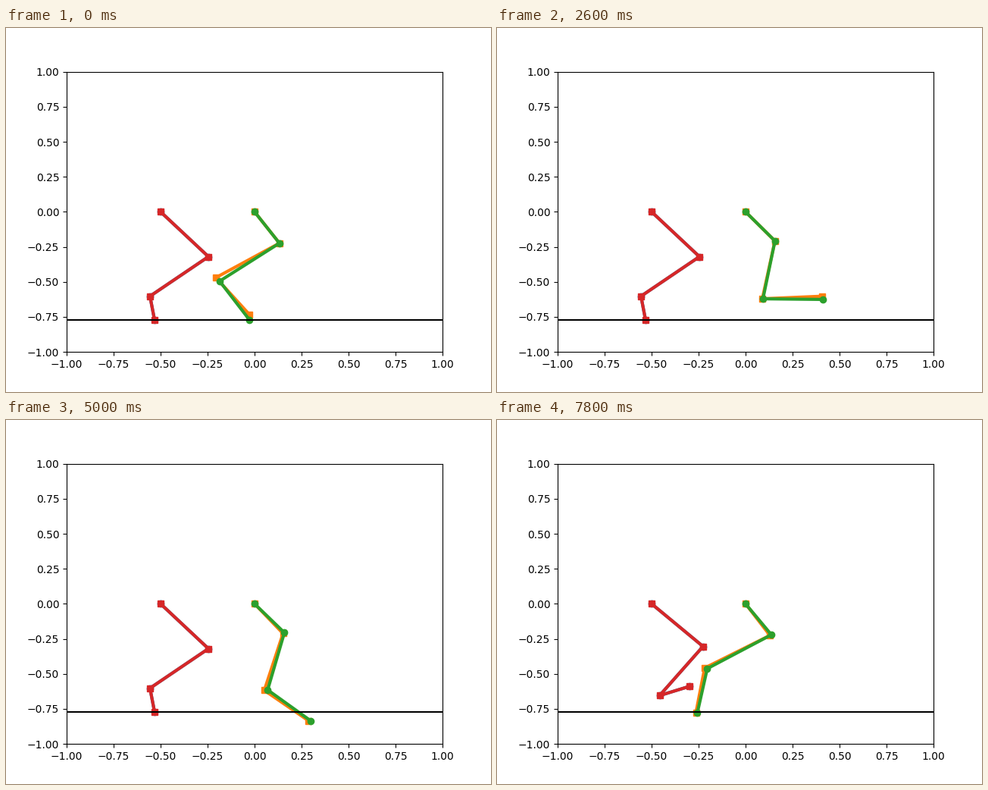
A matplotlib script for the animation above (8 s loop, 640 by 480 pixels).

```python
import numpy as np
import matplotlib.pyplot as plt
from matplotlib.animation import FuncAnimation

STEP = 200      # ms per frame
FRAMES = 40
GROUND = -0.772

# Key poses: time in s, then upper, middle and lower link angle in degrees
FRONT = np.array([
    (0.2, -59.4, -139.6, -60.1),   # lift
    (0.8, -58.8, -142.5, -33),
    (1.6, -56.2, -122.3, 5.7),     # swing
    (2.6, -53, -98.8, -0.8),
    (3.6, -48.8, -80.3, -31),      # reach
    (4.2, -49.5, -86.1, -38.3),    # stance
    (6.2, -57.3, -130, -55.3),
    (7.8, -58.1, -144.7, -99.5),
])
HIND = np.array([
    (6.2, -51.5, -137.8, -81.8),
    (7.2, -50.3, -141, -22),
    (7.8, -48, -123.4, 22.4),
])
FRONT_LINKS = (0.26, 0.418, 0.32)
HIND_LINKS = (0.409, 0.42, 0.17)


def pose(keys, t):
    """Smooth curve through the key poses, held outside their times."""
    ts, angles = keys[:, 0], keys[:, 1:]
    slopes = np.gradient(angles, ts, axis=0)
    t = np.clip(t, ts[0], ts[-1])
    k = min(np.searchsorted(ts, t, side="right"), len(ts) - 1) - 1
    h = ts[k + 1] - ts[k]
    s = (t - ts[k]) / h
    ease = s * s * (3 - 2 * s)
    return ((1 - ease) * angles[k] + ease * angles[k + 1]
            + h * s * (1 - s) * ((1 - s) * slopes[k] - s * slopes[k + 1]))


def tracking_error(t):
    """Angles by which the front leg misses its goal: swing, then stance."""
    t = max(t, FRONT[0, 0])
    s = np.clip((t - 2.4) / 1.8, 0, 1)
    s = s * s * (3 - 2 * s)
    lift = 4 * np.exp((FRONT[0, 0] - t) / 0.3)
    return np.array([2 * s, 0.4 + 1.1 * s + lift, -4.2 + 3 * s])


def joints(hip, links, angles):
    a = np.radians(angles)
    x = hip + np.r_[0, np.cumsum(links * np.cos(a))]
    y = np.r_[0, np.cumsum(links * np.sin(a))]
    return x, y


fig, ax = plt.subplots(figsize=(6.4, 4.8), dpi=100)
ax.set_xlim(-1, 1)
ax.set_ylim(-1, 1)

hind, front_goal, front, hind_goal = [
    ax.plot([], [], marker + "-", lw=3)[0] for marker in "osos"]
hind_goal.set_marker("s")
front_goal.set_marker("s")
ax.plot([-1, 1], [GROUND, GROUND], color="black")


def update(i):
    t = i * STEP / 1000
    angles = pose(FRONT, t)
    front.set_data(*joints(0, FRONT_LINKS, angles))
    front_goal.set_data(*joints(0, FRONT_LINKS, angles - tracking_error(t)))
    for leg in (hind, hind_goal):
        leg.set_data(*joints(-0.5, HIND_LINKS, pose(HIND, t)))
    return hind, front_goal, front, hind_goal


anim = FuncAnimation(fig, update, frames=FRAMES, interval=STEP,
                     repeat=True, repeat_delay=0)
plt.show()
```
